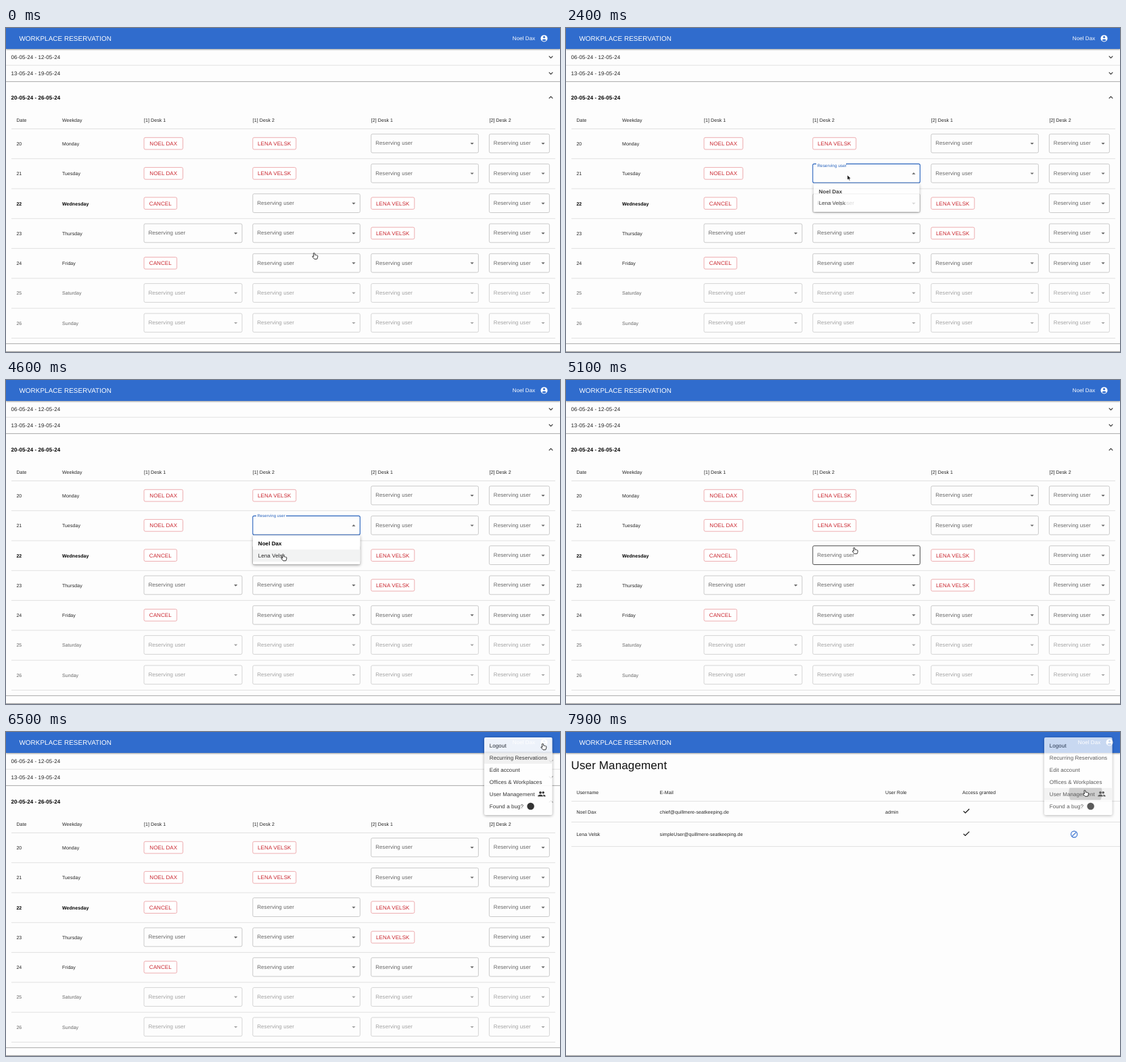
Animation, 819 px wide and 480 px high, one loop 8000 ms. Source, as an HTML page:

```html
<!DOCTYPE html>
<html lang="en">
<head>
<meta charset="utf-8">
<title>Workplace reservation</title>
<style>
  html, body { margin: 0; width: 100%; height: 100%; overflow: hidden; background: #fdfdfd; }
  svg { display: block; width: 819px; height: 480px; }
  text {
    font: 8px "Liberation Sans", Arial, sans-serif;
    letter-spacing: .075px; fill: #222; white-space: pre;
    text-rendering: geometricPrecision;
  }
  .cell { font-size: 7px; }
  .bold { font-weight: bold; fill: #000; }
  .head { fill: #fff; }
  .line { stroke: #dfdfdf; stroke-width: .9; }
  .box { fill: none; stroke: #bdbdbd; stroke-width: .8; }
  .box.hover { stroke: #222; }
  .box.open { stroke: #2863bd; stroke-width: 1.1; }
  .hint { fill: #666; }
  .off .hint { fill: #a2a2a2; }
  .off .box { stroke: #cbcbcb; }
  .btn rect { fill: #fff; stroke: #ea9a9e; stroke-width: .8; }
  .btn.hover rect { fill: #fdf3f3; stroke: #cf3038; }
  .btn text { fill: #c9242d; letter-spacing: .1px; text-anchor: middle; }
  .paper { fill: #fff; filter: drop-shadow(0 1.5px 2px rgba(0,0,0,.38)); }
  .chev { fill: none; stroke: #333; stroke-width: 1.1; }
</style>
</head>
<body>
<svg id="stage" viewBox="0 0 819 480"></svg>
<script>
const USER = 'Noel Dax', MATE = 'Lena Velsk', HOST = '@quillmere-seatkeeping.de';
const LOOP = 8000, STEP = 100;

// Moments of the interaction, in ms
const AT = { cancel: 1020, freed: 1500, open: 2290, pick: 4850, menu: 6350, choose: 7720, page: 7840 };

// Pointer tip: time, x, y
const PATH = [
  [0, 455.5, 333], [100, 444, 268], [200, 430, 232], [300, 430, 232],
  [700, 420.5, 214], [1400, 420.5, 214], [2000, 416, 218], [2700, 416, 218],
  [3600, 409.5, 258.5], [5000, 409.5, 258.5], [5800, 793.5, 17],
  [6900, 793.5, 17], [7500, 767, 86], [8000, 767, 86]
];

const COLS = [[204, 145], [364.8, 158.6], [539.8, 158.6], [714.4, 89]];
const DAYS = ['Monday', 'Tuesday', 'Wednesday', 'Thursday', 'Friday', 'Saturday', 'Sunday'];
// U: user, M: mate, C: cancel, -: free
const PLAN = ['UM--', 'UM--', 'C-M-', '--M-', 'C---', '----', '----'];
const BUTTONS = { U: [USER.toUpperCase(), 57.5], M: [MATE.toUpperCase(), 64], C: ['CANCEL', 48.6] };
const rowY = i => 171.1 + 44.3 * i;

const text = (x, y, s, cls = '') => `<text x="${x}" y="${y}" class="${cls}">${s}</text>`;
const line = (y, x1, x2, extra = '') => `<path class="line" d="M${x1} ${y}H${x2}" ${extra}/>`;
const rect = (x, y, w, h, extra = '') => `<rect x="${x}" y="${y}" width="${w}" height="${h}" ${extra}/>`;
const chevron = (y, dir) => `<path class="chev" d="M802.7 ${y - 1.4 * dir}l2.8 ${2.8 * dir} 2.8 ${-2.8 * dir}"/>`;
const arrow = (x, y, id = '') => `<path class="hint" ${id} d="M${x - 2.6} ${y - 1}h5.2l-2.6 2.7z"/>`;

function select(col, row, id = '') {
  const [x, w] = COLS[col], y = rowY(row);
  return `<g ${id} class="${row > 4 ? 'off' : ''}">` +
    rect(x, y - 14, w, 27.8, 'rx="2" class="box" data-cell') +
    text(x + 6.4, y + 2.3, 'Reserving user', 'hint') +
    arrow(x + w - 9.4, y) + '</g>';
}

function button(kind, col, row, id = '') {
  const [label, w] = BUTTONS[kind], x = COLS[col][0], y = rowY(row);
  return `<g ${id} class="btn">${rect(x, y - 8.8, w, 17.6, 'rx="2"')}` +
    `<text x="${x + w / 2}" y="${y + 2.9}">${label}</text></g>`;
}

function planRow(day, i) {
  const y = rowY(i), style = i === 2 ? 'cell bold' : 'cell' + (i > 4 ? ' hint' : '');
  const cells = [...PLAN[i]].map((k, c) => {
    if (i === 1 && c === 1) return '';
    return k === '-' ? select(c, i) : button(k, c, i);
  }).join('');
  return text(15.4, y + 2.8, 20 + i, style) + text(83, y + 2.8, day, style) + cells + line(y + 22.6, 8, 812);
}

const planner = () => `<g id="planner">
  ${text(7.6, 46, '06-05-24 - 12-05-24')}${chevron(43, 1)}${line(55.2, 0, 819)}
  ${text(7.6, 70, '13-05-24 - 19-05-24')}${chevron(67, 1)}
  ${line(79.4, 0, 819, 'style="stroke:#a2a2a2"')}
  ${text(7.6, 105.8, '20-05-24 - 26-05-24', 'bold')}${chevron(103, -1)}
  ${text(15.4, 138.5, 'Date', 'cell')}${text(83, 138.5, 'Weekday', 'cell')}
  ${['[1] Desk 1', '[1] Desk 2', '[2] Desk 1', '[2] Desk 2'].map((s, i) => text(COLS[i][0], 138.5, s, 'cell')).join('')}
  ${line(149.4, 8, 812)}
  ${DAYS.map(planRow).join('')}
  ${line(467.7, 0, 819, 'style="stroke:#a0a0a0"')}
  ${select(1, 1, 'id="field"')}
  <g id="label">${rect(370, 199, 44, 5, 'id="notch" fill="#fdfdfd"')}<text id="float" x="371.4" style="fill:#2863bd">Reserving user</text></g>
  ${button('M', 1, 1, 'id="mate"')}
  <circle id="splash" cx="421.5" cy="215" fill="#d32f2f" clip-path="url(#btnClip)"/>
</g>`;

const tick = y => `<path d="M587.6 ${y}l2.7 2.7 5.9-5.9" fill="none" stroke="#111" stroke-width="1.2"/>`;

const users = () => `<g id="users">
  ${text(7.6, 55.4, 'User Management', 'title').replace('<text', '<text style="font-size:17px;letter-spacing:.12px;fill:#111"')}
  ${[[15.4, 'Username'], [138.6, 'E-Mail'], [472, 'User Role'], [586, 'Access granted']].map(([x, s]) => text(x, 91.6, s, 'cell')).join('')}
  ${[102.6, 133.4, 169.6].map(y => line(y, 8, 819)).join('')}
  ${text(15.4, 120.5, USER, 'cell')}${text(138.6, 120.5, 'chief' + HOST, 'cell')}${text(472, 120.5, 'admin', 'cell')}
  ${text(15.4, 153.9, MATE, 'cell')}${text(138.6, 153.9, 'simpleUser' + HOST, 'cell')}
  ${tick(117.2)}${tick(150.8)}
  <g fill="none" stroke="#2f6bce" stroke-width="1.1"><circle cx="751.2" cy="151.5" r="4.6"/><path d="M748 154.7l6.4-6.4"/></g>
</g>`;

const header = () => `<g>
  ${rect(0, 0, 819, 31, 'fill="#306ccd" style="filter:drop-shadow(0 1px 1.2px rgba(0,0,0,.4))"')}
  ${text(19.4, 18.8, 'WORKPLACE RESERVATION', 'head').replace('<text', '<text style="font-size:9.9px"')}
  <g id="account">
    <circle id="halo" cx="795.5" cy="15.4" r="10" fill="#000" opacity=".07"/>
    ${text(748.8, 18, USER, 'head')}
    <circle cx="795.5" cy="15.4" r="5" fill="#fff"/>
    <g fill="#306ccd"><circle cx="795.5" cy="13.5" r="1.6"/><path d="M792.3 17.9q3.2-2.8 6.4 0q-3.2 3.4-6.4 0z"/></g>
  </g>
</g>`;

const options = () => `<g id="options">
  ${rect(365, 230.2, 158.6, 43, 'rx="2" class="paper"')}
  ${rect(365, 251.2, 158.6, 18, 'id="optHover" fill="#f2f3f3"')}
  ${text(372.8, 245, USER, 'bold')}${text(372.8, 263, MATE)}
</g>`;

const ITEMS = ['Logout', 'Recurring Reservations', 'Edit account', 'Offices &amp; Workplaces', 'User Management', 'Found a bug?'];
const menu = () => `<g id="menu">
  ${rect(707, 8, 100.6, 115, 'rx="2" class="paper"')}
  ${rect(707, 0, 100.6, 17.9, 'id="itemHover" fill="#f0f0f0"')}
  <circle id="press" cx="768" cy="90" fill="#000" opacity=".2" clip-path="url(#itemClip)"/>
  ${ITEMS.map((s, i) => text(714.8, 22.8 + 17.95 * i, s)).join('')}
  <g fill="#222">
    <circle cx="790" cy="89.8" r="1.9"/><circle cx="794.2" cy="89.8" r="1.7"/>
    <path d="M786.3 95.6v-1.4q3.7-2.9 7.4 0v1.4zM794.5 95.6v-1.6l-.9-1.2q3.2-.1 4 1.6v1.2z"/>
    <circle cx="775.6" cy="110" r="5.3"/>
  </g>
</g>`;

const stage = document.getElementById('stage');
stage.innerHTML = `<defs>
    <clipPath id="btnClip">${rect(364.8, 206.6, 64, 17.6, 'rx="2"')}</clipPath>
    <clipPath id="itemClip">${rect(707, 82.8, 100.6, 17.9)}</clipPath>
  </defs>` +
  rect(0, 0, 819, 480, 'fill="#fdfdfd"') + planner() + users() + header() + options() + menu() +
  line(479.4, 0, 819, 'style="stroke:#8c8c8c"') +
  `<g id="pointer" stroke-linejoin="round">
    <path id="hand" fill="#fff" stroke="#111" stroke-width=".85" d="M-1.1.9Q-.4-.7.8.7L1.4 3.4Q2.3 2.7 2.9 3.6Q3.8 3 4.3 4Q5.5 3.8 5.4 5.2L5.1 7.2L4.4 9.2L.5 9.4L-2.4 6.2Q-2.9 4.7-1.6 5L-.5 5.5Z"/>
    <path id="tip" fill="#000" stroke="#fff" stroke-width=".5" d="M0 0V7L1.6 5.5 2.8 8 3.9 7.5 2.8 5.1H5Z"/>
  </g>`;

const $ = id => document.getElementById(id);
const show = (id, on) => { $(id).style.display = on ? '' : 'none'; };
const set = (id, attrs) => { for (const k in attrs) $(id).setAttribute(k, attrs[k]); };
const clamp = v => Math.min(1, Math.max(0, v));

// cubic-bezier(.4, 0, .2, 1)
function ease(p) {
  p = clamp(p);
  let lo = 0, hi = 1, u = p;
  for (let i = 0; i < 20; i++) {
    u = (lo + hi) / 2;
    const x = 1.2 * u * (1 - u) ** 2 + .6 * u * u * (1 - u) + u ** 3;
    if (x < p) lo = u; else hi = u;
  }
  return u * u * (3 - 2 * u);
}
const prog = (t, start, length) => ease((t - start) / length);

function pointerAt(t) {
  let i = 1;
  while (PATH[i][0] < t) i++;
  const [a, x, y] = PATH[i - 1], [b, x2, y2] = PATH[i], p = ease((t - a) / (b - a));
  return [x + (x2 - x) * p, y + (y2 - y) * p];
}

// Popup fades while growing from an anchor point; it only fades on the way out
function grow(id, t, from, to, ax, ay) {
  const length = 230;
  show(id, t >= from && t < to + length);
  const s = prog(t, from, length * .666), k = .75 + .25 * s;
  set(id, {
    opacity: prog(t, from, length) * (1 - prog(t, to, length)),
    transform: `translate(${ax} ${ay}) scale(${k} ${k * k}) translate(${-ax} ${-ay})`
  });
}

const boxes = [...document.querySelectorAll('[data-cell]')].map(el => ({
  el, x: +el.getAttribute('x'), y: +el.getAttribute('y'),
  w: +el.getAttribute('width'), h: +el.getAttribute('height')
}));
const fieldBox = $('field').querySelector('rect');
const fieldHint = $('field').querySelector('text');
const fieldArrow = $('field').querySelector('path');
const satBox = boxes.find(b => b.x === COLS[1][0] && Math.abs(b.y - rowY(5) + 14) < 1);

function draw(t) {
  const [px, py] = pointerAt(t);
  const opened = t >= AT.open && t < AT.pick;
  const free = t >= AT.freed && t < AT.pick + 150;
  const second = t >= AT.page;

  show('planner', !second);
  show('users', second);
  set('account', { transform: `translate(${second ? 8 : 0} 0)` });
  show('halo', t >= 5600 && t < AT.menu + 100);

  // Desk field and its button
  show('field', free);
  show('mate', !free);
  $('mate').classList.toggle('hover', !free && px < 429 && py > 206 && py < 224.5 && px > 364);
  show('splash', t >= AT.cancel && t < AT.freed);
  set('splash', {
    r: 58 * prog(t, AT.cancel, 500),
    opacity: .24 * (1 - prog(t, AT.cancel + 200, 550))
  });

  for (const b of boxes) {
    const inside = px > b.x && px < b.x + b.w && py > b.y && py < b.y + b.h;
    b.el.classList.toggle('hover', inside && !opened && !second || b === satBox && t < 100);
  }
  fieldBox.classList.toggle('open', opened);
  fieldHint.style.display = opened ? 'none' : '';
  fieldArrow.setAttribute('transform', opened ? 'rotate(180 514 215.6)' : '');
  const lift = prog(t, AT.open, 200);
  show('label', opened);
  set('notch', { opacity: lift > .7 ? 1 : 0 });
  set('float', { y: 217.7 - 14.4 * lift });
  $('float').style.fontSize = 8 - 2 * lift + 'px';

  grow('options', t, AT.open, AT.pick, 444, 230);
  show('optHover', py > 233);
  set('optHover', { y: py > 251 ? 251.2 : 233.2 });

  // Account menu
  grow('menu', t, AT.menu, AT.page, 795, 12);
  const item = t <= 6900 ? 1 : Math.floor((py - 11) / 17.95);
  set('itemHover', { y: 11.1 + 17.95 * item });
  set('press', { r: t < AT.choose ? 0 : 56 * prog(t, AT.choose, 550) });

  const plain = opened && py < 233;
  show('hand', !plain);
  show('tip', plain);
  set('pointer', { transform: `translate(${px} ${py})` });
}

const begin = performance.now();
function loop(now) {
  const t = Math.max(0, now - begin) % LOOP;
  draw(Math.floor(t / STEP) * STEP);
  requestAnimationFrame(loop);
}
draw(0);
requestAnimationFrame(loop);
</script>
</body>
</html>
```
